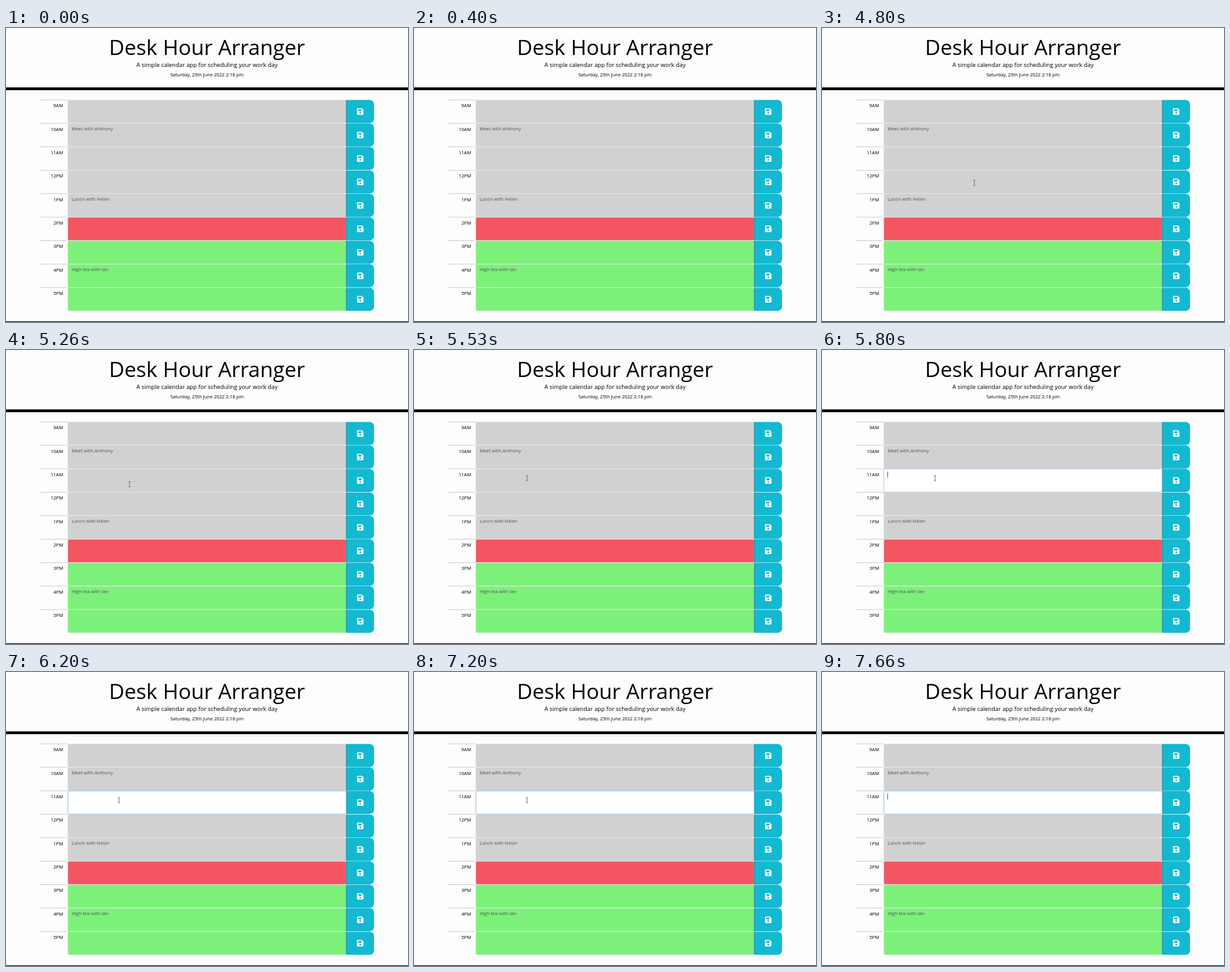
An HTML page that plays this animation: 640x468 px, repeating every 8 s.

```html
<!DOCTYPE html>
<html lang="en">
<head>
<meta charset="utf-8">
<style>
  html, body { margin: 0; width: 100%; height: 100%; overflow: hidden; background: #fdfdfd; }
  svg { display: block; width: 640px; height: 468px; font: 7.47px "Open Sans", "Noto Sans", sans-serif; }
  .head { text-anchor: middle; }
  .hour { text-anchor: end; }
  .note { fill: #50545a; }
</style>
</head>
<body>
<svg viewBox="0 0 640 468">
  <defs>
    <g id="save">
      <path fill="#fff" fill-rule="evenodd" d="M1.2 0H7.8L10.4 2.6V9.2Q10.4 10.4 9.2 10.4H1.2Q0 10.4 0 9.2V1.2Q0 0 1.2 0Z
        M1.8 1.5H7.2V4.4H1.8Z M5.2 6A1.45 1.45 0 0 0 5.2 8.9A1.45 1.45 0 0 0 5.2 6Z"/>
    </g>
  </defs>
  <g class="head">
    <text x="320" y="42.7" font-size="33.6">Desk Hour Arranger</text>
    <text x="320" y="61.6" font-size="9.34">A simple calendar app for scheduling your work day</text>
    <text x="320" y="77">Saturday, 25th June 2022 2:18 pm</text>
  </g>
  <path d="M0 94.4H640V99H0Z M0 467H640V468H0Z"/>
  <g id="rows"></g>
  <rect id="ring" x="98.4" y="189.2" width="443" height="36.9" rx="1.9" fill="none" stroke="#9fc3ee" stroke-width="1"/>
  <path id="caret" d="M104.6 193.6V203" stroke="#333" stroke-width=".8"/>
  <path id="beam" d="M-1.9 -4.3Q0 -4.3 0 -3.2Q0 -4.3 1.9 -4.3M0 -3.2V3.2M-1.9 4.3Q0 4.3 0 3.2Q0 4.3 1.9 4.3" fill="none" stroke="#666" stroke-width=".9"/>
</svg>
<script>
const LOOP = 8000, TOP = 114.4, PITCH = 37.35;
const GREY = '#d1d1d1', RED = '#f35662', GREEN = '#7cf17a', CYAN = '#13b9d1';
const hours = ['9AM', '10AM', '11AM', '12PM', '1PM', '2PM', '3PM', '4PM', '5PM'];
const notes = { 1: 'Meet with Anthony', 4: 'Lunch with Helen', 7: 'High tea with Ian' };
const $ = id => document.getElementById(id);

$('rows').innerHTML = hours.map((hour, i) => {
  const y = TOP + i * PITCH, fill = i < 5 ? GREY : i === 5 ? RED : GREEN;
  return `<path d="M54 ${y}H98.5" stroke="#777" stroke-width=".5" stroke-dasharray="1.4 .5"/>
    <text class="hour" x="91" y="${y + 11.8}">${hour}</text>
    <rect id="slot${i}" x="98.5" y="${y + .3}" width="443" height="36.6" rx="1.9" fill="${fill}" stroke="#ced4da" stroke-width=".4"/>
    <text class="note" x="104.4" y="${y + 11.6}">${notes[i] || ''}</text>
    <path d="M541.7 ${y + .2}H579a7 7 0 0 1 7 7V${y + 30}a7 7 0 0 1 -7 7H541.7Z" fill="${CYAN}"/>
    <path d="M541.8 ${y + .2}v36.8" stroke="#234" stroke-width=".5"/>
    <use href="#save" x="558.8" y="${y + 13.4}"/>`;
}).join('');

function pointer(t) {
  if (t < 4860) return [242.5, 246.5];
  if (t < 5000) return [211.5, 224.5];
  if (t < 5260) return [206, 219];
  const p = Math.min(1, (Math.floor((t - 5260) / 67) + 1) / 5);
  const e = 1 - (1 - p) ** 2;
  return [206 - 26 * e, 219 - 15 * e];
}

function draw(t) {
  const focused = t >= 5660;
  $('slot2').setAttribute('fill', focused ? '#fff' : GREY);
  $('ring').setAttribute('opacity', Math.max(0, Math.min(1, (t - 5690) / 150)));
  $('caret').setAttribute('opacity', focused && (t - 5660) % 1000 < 540 ? 1 : 0);
  $('beam').setAttribute('opacity', t >= 4800 && t < 7460 ? 1 : 0);
  $('beam').setAttribute('transform', `translate(${pointer(t)})`);
}

const start = performance.now();
function tick() {
  draw((performance.now() - start) % LOOP);
  requestAnimationFrame(tick);
}
tick();
</script>
</body>
</html>
```
